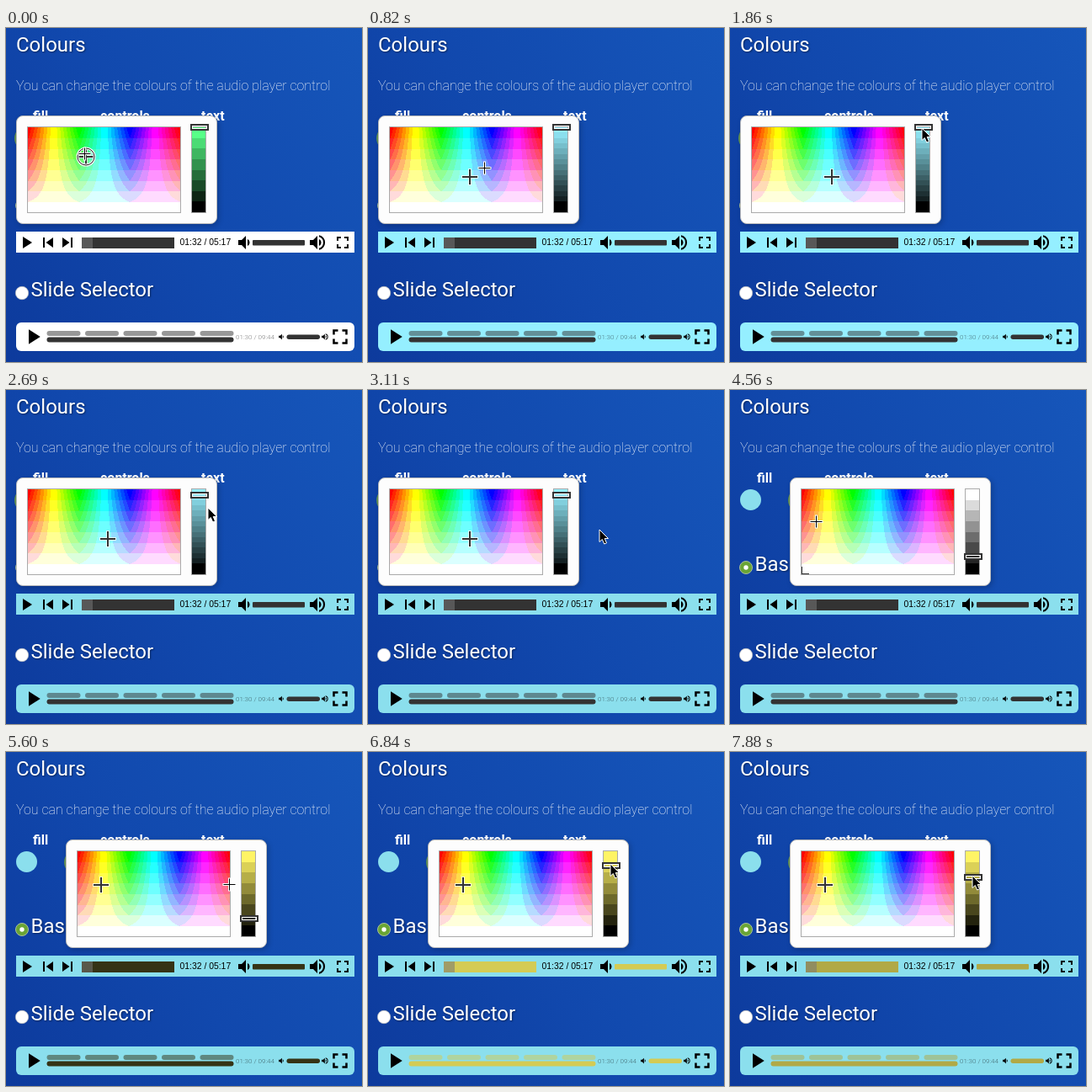
Recreate the animation shown at these times as an HTML page with a canvas. Size 423 by 397 pixels, loop 8000 ms.

```html
<!DOCTYPE html>
<html lang="en">
<head>
<meta charset="utf-8">
<title>Player colours</title>
<style>
html, body { margin: 0; width: 100%; height: 100%; overflow: hidden; }
body { position: relative; background: linear-gradient(60deg, #0d3a9c, #1148ad 45%, #1656ba); --fill: #fff; --ctl: #333; }
svg { position: absolute; left: 0; top: 0; display: block; }
text { font-family: Roboto, sans-serif; fill: #fff; }
.title { font-size: 24px; text-shadow: 1px 1px 2px rgba(0,0,0,.45); }
.lead { font-size: 16px; font-weight: 100; }
.label { font-size: 16px; font-weight: 700; }
.time { font: 10.4px "Liberation Sans", Arial, sans-serif; fill: #000; }
.small { font-size: 8px; font-weight: 300; fill: #000; opacity: .5; }
.fill { fill: var(--fill); }
.ctl { fill: var(--ctl); }
#picker { position: absolute; left: 12px; top: 104px; width: 237px; height: 127px; background: #fdfdfd;
  border: 1px solid #bbb; border-radius: 8px; box-shadow: 2px 2px 6px rgba(0,0,0,.2); }
#pad, #slider { position: absolute; top: 12px; height: 101px; border: 1px solid #aaa; overflow: hidden; }
#pad { left: 12px; width: 181px; }
#slider { left: 207px; width: 16px; }
#thumb { position: absolute; left: 206px; width: 18px; height: 4px; border: 2px solid #333; outline: 1px solid #fff;
  outline-offset: -3px; }
canvas { display: block; }
</style>
</head>
<body>
<svg width="423" height="397">
  <defs>
    <path id="play" d="M8 5v14l11-7z"/>
    <path id="prev" d="M6 6h2v12H6zm3.5 6l8.5 6V6z"/>
    <path id="next" d="M6 18l8.5-6L6 6zM16 6v12h2V6z"/>
    <path id="quiet" d="M18.5 12c0-1.8-1-3.3-2.5-4v8c1.5-.7 2.5-2.2 2.5-4zM5 9v6h4l5 5V4L9 9z"/>
    <path id="loud" d="M3 9v6h4l5 5V4L7 9zm13.500 3c0-1.800-1-3.300-2.500-4v8c1.500-.7 2.500-2.200 2.500-4zM14 3.200v2.100a7 7 0 0 1 0 13.400v2.100a9 9 0 0 0 0-17.600z"/>
    <path id="full" d="M7 14H5v5h5v-2H7zM5 10h2V7h3V5H5zm12 7h-3v2h5v-5h-2zM14 5v2h3v3h2V5z"/>
  </defs>

  <text class="title" x="12" y="28">Colours</text>
  <text class="lead" x="12" y="74">You can change the colours of the audio player control</text>
  <g class="label">
    <text x="32" y="110">fill</text>
    <text x="112" y="110">controls</text>
    <text x="232" y="110">text</text>
  </g>
  <circle id="focus" cy="131" r="13.500" fill="none" stroke="#659453" stroke-width="2"/>
  <circle class="fill" cx="24.500" cy="130.500" r="12.500"/>
  <circle class="ctl" cx="83.500" cy="130.500" r="12.500"/>
  <circle cx="224.500" cy="130.500" r="12.500"/>

  <circle cx="19" cy="211" r="7.500" fill="#6aa534" stroke="#a9bf9c"/>
  <circle cx="19" cy="211" r="2.700" fill="#fff"/>
  <text class="title" x="29.500" y="215">Basic Player</text>
  <rect class="fill" x="12" y="242" width="402" height="25"/>
  <use href="#play" x="12" y="243"/>
  <use href="#prev" x="38" y="243"/>
  <use href="#next" x="61" y="243"/>
  <rect class="ctl" x="90" y="249" width="110" height="13"/>
  <rect x="90" y="249" width="13" height="13" fill="#777" opacity=".55"/>
  <text class="time" x="206.500" y="258">01:32 / 05:17</text>
  <use href="#quiet" x="271" y="243"/>
  <rect class="ctl" x="293" y="252" width="62" height="6.500" rx="1"/>
  <use href="#loud" x="358" y="243"/>
  <use href="#full" x="388" y="243"/>

  <circle cx="19" cy="315" r="7.700" fill="#fff" stroke="#bbb" stroke-width=".7"/>
  <text class="title" x="29.500" y="319">Slide Selector</text>
  <rect class="fill" x="12" y="350" width="402" height="34" rx="6"/>
  <use href="#play" transform="translate(17 352) scale(1.25)"/>
  <g id="segments" class="ctl" opacity=".5"></g>
  <rect class="ctl" x="48.500" y="367.500" width="222" height="6" rx="3"/>
  <text class="small" x="273" y="370">01:30 / 09:44</text>
  <use href="#quiet" transform="translate(322 362) scale(.42)"/>
  <rect class="ctl" x="333.500" y="364.500" width="39.500" height="5.500" rx="2.700"/>
  <use href="#loud" transform="translate(373.800 362) scale(.42)"/>
  <use href="#full" transform="translate(382 352) scale(1.25)"/>
</svg>

<div id="picker">
  <div id="pad">
    <canvas id="hues" width="181" height="101"></canvas>
    <svg width="181" height="101">
      <g id="mark" fill="none">
        <path d="M-10 0H10M0-10V10" stroke="#fff" stroke-width="4" opacity=".75"/>
        <path d="M-9 0H9M0-9V9" stroke="#333" stroke-width="2"/>
      </g>
    </svg>
  </div>
  <div id="slider"></div>
  <div id="thumb"></div>
</div>

<svg width="423" height="397">
  <g id="ring" fill="none">
    <circle cx="95" cy="153" r="10" stroke="#fff" stroke-width="3"/>
    <circle cx="95" cy="153" r="10" stroke="#222"/>
  </g>
  <g id="cross">
    <path d="M-7.500 .5H8.500M.5-7.500V8.500" stroke="#fff" stroke-width="3"/>
    <path d="M-6.500 .5H7.500M.5-6.500V7.500" stroke="#000"/>
  </g>
  <path id="arrow" d="M0 0V14.500L3.300 11.500 5.700 17 8.500 15.800 6.200 10.500H10.500Z" stroke="#fff"/>
  <path id="hand" d="M-2 1Q-2-1 0-1T2 1V6Q4 4.500 5 6.500 7 5.500 7.500 7.500 9.500 7 9.500 9V12Q9 14 8 16H0L-4 9.500Q-4.500 7.500-2 8.500Z M2 9V13M4.500 9V13M7 9V13" fill="#fff" stroke="#000"/>
</svg>

<script>
const LOOP = 8000, STEP = 207.5, FIRST = 197;
const PAD = { x: 26, y: 118, w: 181, h: 101 };
const SHIFT = 59;
const $ = id => document.getElementById(id);

// Rows are [step, ...values].
const mousePath = [
  [0, 93, 149], [1, 105, 163], [3, 121, 177], [4, 138, 166], [6, 192, 135], [9, 228, 119],
  [10, 230, 118], [12, 230, 118], [13, 240, 140], [15, 275, 166], [16, 262, 172], [19, 83, 138],
  [20, 85, 140], [24, 118, 172], [25, 113, 158], [26, 113, 158], [27, 265, 157], [28, 280, 177],
  [29, 288, 196], [32, 288, 125], [33, 288, 133], [34, 288, 133], [35, 288, 126], [38, 288, 147]
];
const fillMark = [[0, 95, 153], [3, 121, 177]];
const fillThumb = [[12, 118], [13, 125]];
const ctlMark = [[23, 85, 219], [24, 118, 172], [25, 113, 158]];
const ctlThumb = [[29, 198], [32, 127], [33, 135], [34, 135], [35, 128], [38, 149]];

function at(track, step) {
  const next = track.findIndex(row => row[0] >= step);
  if (next < 0) return track[track.length - 1].slice(1);
  if (next === 0) return track[0].slice(1);
  const a = track[next - 1], b = track[next];
  const k = (step - a[0]) / (b[0] - a[0]);
  return a.slice(1).map((v, i) => v + (b[i + 1] - v) * k);
}

function hsv(h, s, v) {
  return [5, 3, 1].map(n => {
    const k = (n + h * 6) % 6;
    return v * (1 - s * Math.max(0, Math.min(k, 4 - k, 1)));
  });
}
const css = rgb => `rgb(${rgb.map(c => Math.round(c * 255))})`;
const level = y => (PAD.y + PAD.h - y) / PAD.h;

function pick([x, y], thumb, shift) {
  return hsv((x - PAD.x - shift) / PAD.w, level(y), level(thumb));
}

// The pad shows eight levels per channel.
function paintPad() {
  const ctx = $("hues").getContext("2d");
  const image = ctx.createImageData(PAD.w, PAD.h);
  for (let y = 0, i = 0; y < PAD.h; y++) {
    for (let x = 0; x < PAD.w; x++) {
      for (const c of hsv(x / PAD.w, 1 - y / PAD.h, 1)) {
        image.data[i++] = Math.min(7, Math.floor(c * 8)) / 7 * 255;
      }
      image.data[i++] = 255;
    }
  }
  ctx.putImageData(image, 0, 0);
}

function shades(color, bands) {
  const stops = Array.from({ length: bands }, (_, i) => {
    const v = i >= bands * 7 / 8 ? 0 : 1 - i / (bands - 1);
    return `${css(color.map(c => c * v))} ${i / bands * 100}% ${(i + 1) / bands * 100}%`;
  });
  return `linear-gradient(${stops})`;
}

function show(id, visible) { $(id).style.display = visible ? "" : "none"; }
function move(id, x, y) { $(id).setAttribute("transform", `translate(${x} ${y})`); }

function draw(step) {
  const open = step < 16 ? "fill" : step >= 20 ? "ctl" : "";
  const [mx, my] = at(mousePath, step).map(Math.round);
  const fill = step > 0 ? pick(at(fillMark, step), at(fillThumb, step)[0], 0) : [1, 1, 1];
  const ctl = step > 26 ? pick(at(ctlMark, step), at(ctlThumb, step)[0], SHIFT) : [.2, .2, .2];
  document.body.style.setProperty("--fill", css(fill));
  document.body.style.setProperty("--ctl", css(ctl));

  const shift = open === "ctl" ? SHIFT : 0;
  show("picker", open);
  show("focus", open);
  if (open) {
    const mark = at(shift ? ctlMark : fillMark, step);
    const [thumb] = at(shift ? ctlThumb : fillThumb, step);
    $("picker").style.left = 12 + shift + "px";
    $("focus").setAttribute("cx", 24.5 + shift);
    move("mark", mark[0] - PAD.x - shift, mark[1] - PAD.y);
    $("slider").style.background = shades(pick(mark, PAD.y, shift), !shift && step > 1 ? 16 : 8);
    $("thumb").style.top = Math.round(thumb) - 109 + "px";
  }

  const px = mx - PAD.x - shift, py = my - PAD.y;
  const inPad = open && px >= 0 && px < PAD.w && py >= 0 && py < PAD.h;
  const onSwatch = !open && Math.hypot(mx - 83.5, my - 130.5) < 13;
  const cursor = inPad ? "cross" : onSwatch ? "hand" : "arrow";
  for (const id of ["cross", "hand", "arrow"]) show(id, id === cursor);
  move(cursor, mx, my);
  show("ring", step === 0);
}

for (let i = 0; i < 5; i++) {
  $("segments").innerHTML += `<rect x="${48.5 + i * 45.5}" y="360" width="40" height="6" rx="3"/>`;
}
paintPad();

let last = -1;
const start = performance.now();
function tick(now) {
  const t = Math.max(0, now - start) % LOOP;
  const step = Math.floor((t - FIRST) / STEP) + 1;
  if (step !== last) draw(last = step);
  requestAnimationFrame(tick);
}
draw(0);
requestAnimationFrame(tick);
</script>
</body>
</html>
```
